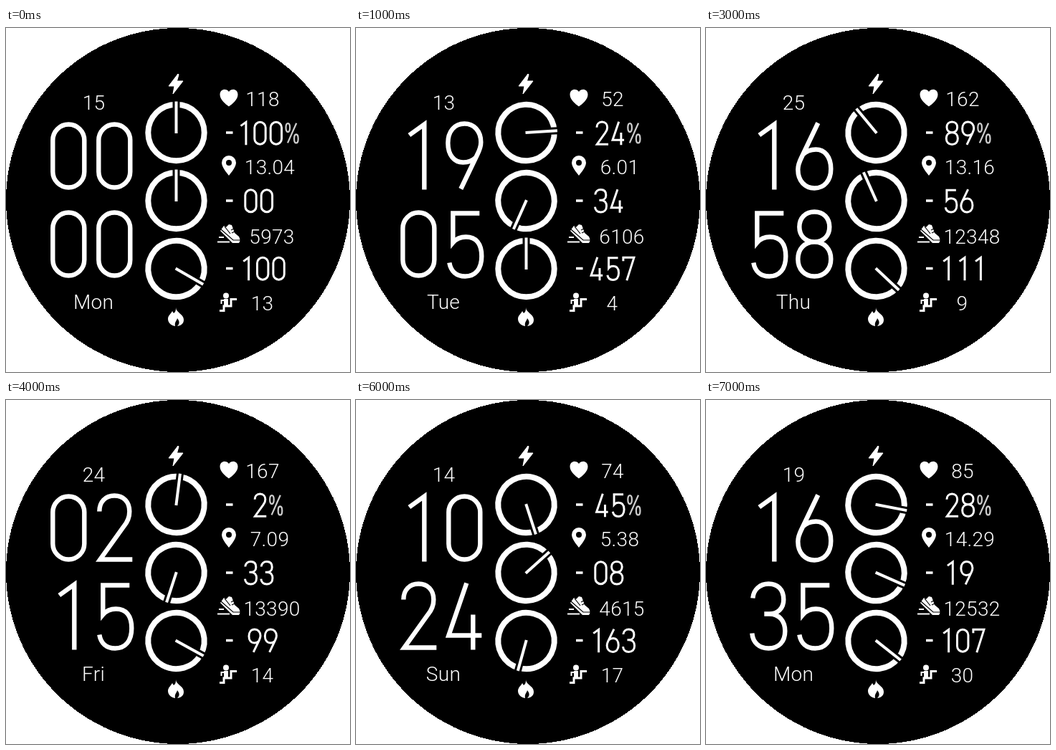
Write an HTML page that moves like this. It is 480x480 px and loops after 8 s.

```html
<!DOCTYPE html>
<html>
<head>
<meta charset="utf-8">
<style>
html, body { margin: 0; width: 100%; height: 100%; overflow: hidden; background: #fff; }
svg { display: block; width: 480px; height: 480px; }
text { font: 300 28px Roboto, sans-serif; letter-spacing: .3px; text-anchor: middle; fill: #fff; }
.line { fill: none; stroke: #fff; }
</style>
</head>
<body>
<svg viewBox="0 0 480 480">
  <circle cx="240" cy="240" r="240" shape-rendering="crispEdges"/>
  <g fill="#fff">
    <path d="M240 64L227 81H235L233 92L247 74H238.500L241 65Z" stroke="#fff" stroke-linejoin="round"/>
    <path d="M237 390C237 397 248 399 248 407C248 412 245 415 239 416C243 412 242 409 239 405C238 409 235 410 236 416C230 415 226 411 226 406C226 401 230 399 232 395L234 398C237 396 237 393 237 390Z"/>
    <path d="M311 109.500C306 106 298.500 100 298.500 93C298.500 85 307.500 83.500 311 89C314.500 83.500 323.500 85 323.500 93C323.500 100 316 106 311 109.500Z"/>
    <path fill-rule="evenodd" d="M311 206C308 202 301 194 301 188A10 10 0 0 1 321 188C321 194 314 202 311 206ZM307 188a4 4 0 1 0 8 0a4 4 0 1 0 -8 0Z"/>
    <path d="M299 283L304 276L307 278L311 274L315 275L319 286L325 291Q328 297 325 300H316Z"/>
    <circle cx="307" cy="373.500" r="4"/>
  </g>
  <g class="line" stroke-width="2">
    <path d="M297 292H304M295 298.500H312"/>
    <path d="M300 281L317 296H328M305 277L313 287M314 282L318 280M315 286L319 284" stroke="#000" stroke-width="1.200"/>
    <path d="M300.500 385V380H308"/>
    <path d="M307 378V387" stroke-width="6"/>
    <path d="M298 394.500H304V388H314V378.500H322" stroke-width="3"/>
    <path d="M307 146H316.500M307 241H316.500M307 335.500H316.500" stroke-width="3.500"/>
  </g>
  <g id="face"></g>
</svg>
<script>
// Centre lines of the narrow numerals, in a 44 x 90 box
const glyphs = {
  0: 'M0 23A22 22 0 0 1 44 23V67A22 22 0 0 1 0 67Z',
  1: 'M9 16L30 1V92',
  2: 'M1 22C1 9 9 0 22 0C35 0 43 9 43 22C43 31 40 37 35 43L2 89H47',
  3: 'M0 20C1 8 10 0 22 0C35 0 43 8 43 22C43 34 35 42 23 42H16M23 42C37 42 45 52 45 66C45 81 36 90 22 90C9 90 0 82 -1 69',
  4: 'M25 -1L0 72H46M34 43V92',
  5: 'M43 2H6V43C11 37 16 35 24 35C38 35 46 44 46 62C46 80 37 90 23 90C11 90 3 83 1 71',
  6: 'M27 -1L4 47C1 53 -1 58 -1 64C-1 80 9 90 22 90C36 90 45 79 45 63C45 46 36 36 24 36C17 36 11 38 6 43',
  7: 'M0 15V1H43L14 92',
  8: 'M22 0C35 0 43 9 43 21S35 42 22 42S1 33 1 21S9 0 22 0ZM22 42C36 42 45 52 45 66S36 90 22 90S-1 80 -1 66S8 42 22 42Z',
  9: 'M17 91L40 43C43 37 45 32 45 26C45 10 35 0 22 0C8 0 -1 11 -1 27C-1 44 8 54 20 54C27 54 33 52 38 47',
  '%': 'M39 5L4 84M5 6C10 6 13 12 13 23S10 40 5 40S-3 34 -3 23S0 6 5 6ZM38 50C43 50 46 56 46 67S43 84 38 84S30 78 30 67S33 50 38 50Z'
};
const PITCH = 64;

// date, weekday, hour, minute, second, battery, calories, pulse, distance, steps, floors
const states = [
  ['15', 'Mon', '00', '00', 0, 100, 100, 118, '13.04', 5973, 13],
  ['13', 'Tue', '19', '05', 34, 24, 457, 52, '6.01', 6106, 4],
  ['17', 'Wed', '12', '56', 21, 73, 186, 96, '9.45', 11064, 22],
  ['25', 'Thu', '16', '58', 56, 89, 111, 162, '13.16', 12348, 9],
  ['24', 'Fri', '02', '15', 33, 2, 99, 167, '7.09', 13390, 14],
  ['01', 'Sat', '19', '02', 46, 61, 247, 48, '0.71', 828, 34],
  ['14', 'Sun', '10', '24', 8, 45, 163, 74, '5.38', 4615, 17],
  ['19', 'Mon', '16', '35', 19, 28, 107, 85, '14.29', 12532, 30]
];

const label = (x, y, value) => `<text x="${x}" y="${y}">${value}</text>`;

function numerals(value, x, y, scale, weight) {
  const paths = [...String(value)].map((c, i) =>
    `<path transform="translate(${i * PITCH})" d="${glyphs[c]}"${c === '%' ? ' stroke="#ccc" stroke-width="6.5"' : ''}/>`);
  return `<g class="line" role="img" aria-label="${value}" stroke-width="${weight}"
    transform="translate(${x} ${y}) scale(${scale})">${paths.join('')}</g>`;
}

function reading(value, centre, y) {
  const scale = 0.35;
  const x = centre - String(value).length * PITCH * scale / 2 + 3.2;
  return numerals(value, x, y, scale, 8.5);
}

function gauge(y, fraction) {
  return `<g class="line" transform="translate(237.5 ${y}) rotate(${Math.min(fraction, 1) * 360})">
    <circle r="39.2" stroke-width="8"/>
    <path d="M0 -34V-45" stroke="#000" stroke-width="10"/>
    <path d="M0 1V-43.500" stroke-width="4"/></g>`;
}

function render([date, day, hour, minute, second, battery, calories, pulse, distance, steps, floors]) {
  return label(122.5, 114, date) + label(122, 392, day) +
    numerals(hour, 65.3, 133.5, 1, 6.4) + numerals(minute, 65.3, 256.5, 1, 6.4) +
    gauge(146, battery / 100) + gauge(241, second / 60) + gauge(336, calories / 300) +
    label(358, 108.5, pulse) + label(368, 204, distance) +
    label(371, 300.5, steps) + label(357.5, 394, floors) +
    reading(battery + '%', 366, 131) +
    reading(String(second).padStart(2, '0'), 353, 225.5) +
    reading(calories, 358.5, 320);
}

const face = document.getElementById('face');
let shown = -1;
function tick() {
  const index = Math.floor(performance.now() / 1000) % states.length;
  if (index !== shown) face.innerHTML = render(states[shown = index]);
  requestAnimationFrame(tick);
}
tick();
</script>
</body>
</html>
```
